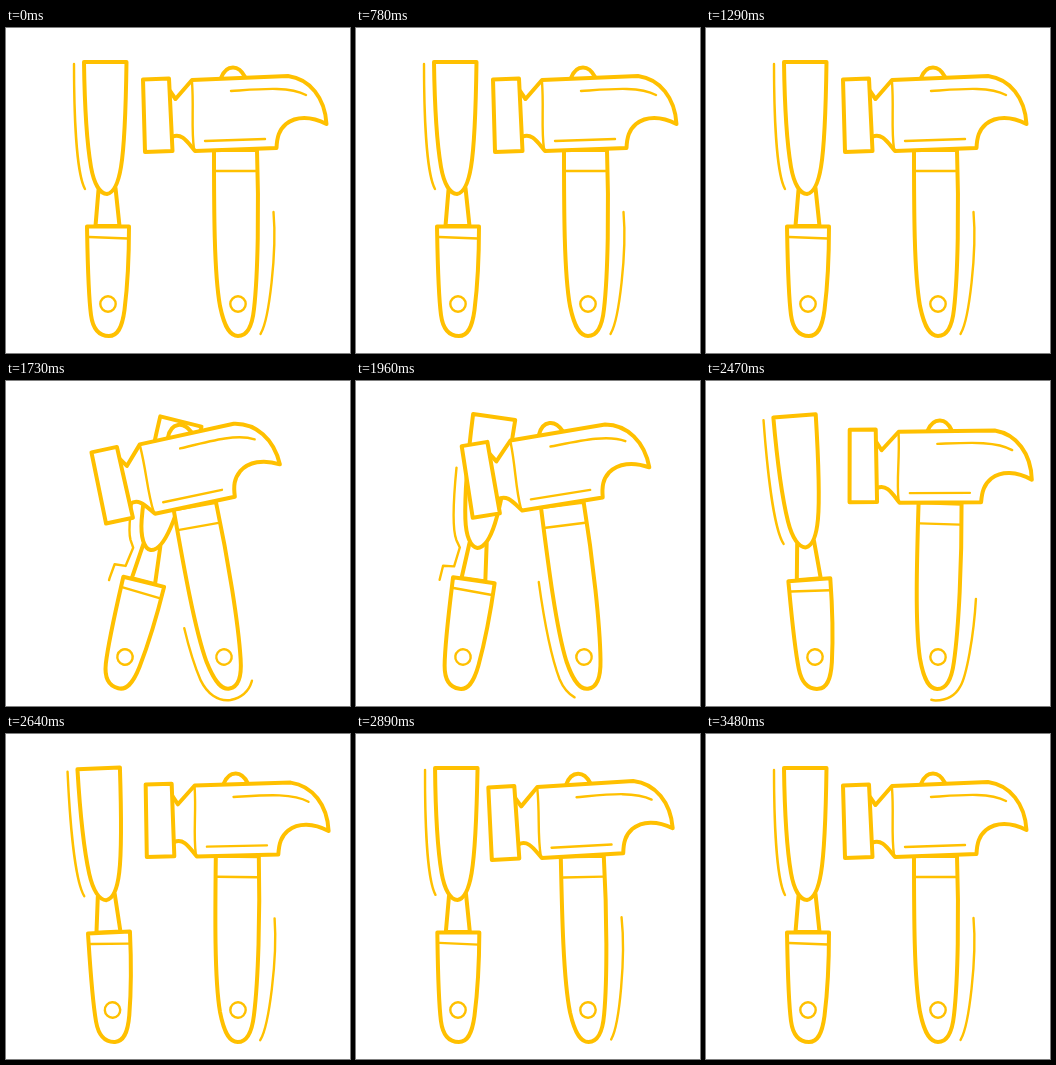
These frames come from a looping animation (344x325 px, 3560 ms). An HTML page:

```html
<!DOCTYPE html>
<html lang="en">
<head>
<meta charset="utf-8">
<title>Hammer and chisel</title>
<style>
html, body { margin: 0; width: 100%; height: 100%; overflow: hidden; background: #fff; }
svg { display: block; width: 344px; height: 325px; }
g { fill: #fff; stroke: #ffc000; stroke-width: 4; stroke-linejoin: round; stroke-linecap: round; }
.thin { fill: none; stroke-width: 2.4; }
.open { fill: none; }
</style>
</head>
<body>
<svg viewBox="0 0 344 325">
  <g id="chisel">
    <path d="M92.5 162L89.5 198H113.5L109.5 160"/>
    <path d="M78 34H120.5C120 70 119 115 115 139C112 157 107 165 101 166C94 166 88 156 85 139C80 110 78.5 70 78 34Z"/>
    <path d="M81 198.500H123C123 225 121 262 118.500 282C116 301 111 308 103 308C94 308 87 302 85 287C82 264 81.500 225 81 198.500Z"/>
    <path class="thin" d="M83 209L122 210.500"/>
    <circle class="thin" cx="102" cy="276" r="7.700"/>
    <path class="thin" id="chiselLine" d="M68 36C68 80 70 145 79 161L83.500 168L80.500 187.500L69.500 188.500L68 203L67 230"/>
  </g>
  <g id="hammer">
    <path class="thin" id="hammerLine" pathLength="291" d="M196.500 196C197 240 199 270 205 295C209 309 218 319 231 319.500C243 319 251 313 255 305C263 291 271 225 267.500 184"/>
    <path d="M208 122C208 180 208 245 214 278C219 302 225 308 232 308C240 308 246 300 248 281C252 246 253 180 251 122Z"/>
    <path class="thin" d="M210 143H250"/>
    <circle class="thin" cx="232" cy="276" r="7.700"/>
    <path d="M215 50C218 42 222 39.500 227 39.500C233 39.500 236 43 239 49"/>
    <path d="M164 63L169.500 71L186 52L282 48C304 51 319 70 320.500 96C305 88 290 88 280 96C273 102 271 109 270.500 120L189 123C182 115 176 104 166 109"/>
    <path d="M137 51.500L163 50.500L166.500 123L139 124Z"/>
    <path class="thin" d="M186 54C188 80 185 100 188 121M225 63C255 61 283 58 300 67M199 113L259 111"/>
  </g>
</svg>
<script>
const LOOP = 3560, STEPS = 42;
const el = id => document.getElementById(id);

// Tracks are [step, value] pairs, eased between neighbours.
const tools = [
  {
    name: "chisel", pivot: 102, dash: 126,
    x: [[18.3, 0], [20, 17], [21, 20], [25, -10], [26, -10], [29, 7], [34, 0]],
    turn: [[18.3, 0], [20, 14], [21, 16.5], [26, -7.5], [29, -4.2], [34, .25], [37, 0]],
    slide: [[18.3, 0], [20, 56], [21, 70], [25, 37], [29, 0]]
  },
  {
    name: "hammer", pivot: 232, dash: 124,
    x: [[18.3, 0], [20, -14], [21, -16], [25, 8], [26, 7.5], [29, 0]],
    turn: [[18.3, 0], [20, -10], [21, -12], [26, 1.7], [29, 1.7], [34, -1.2], [37, 0]],
    slide: [[18.3, 167], [20, 45], [22, 0], [25, 0], [29, 134], [31, 167]]
  }
];

function at(track, k) {
  const i = track.findIndex(p => p[0] > k);
  if (i === 0) return track[0][1];
  if (i < 0) return track[track.length - 1][1];
  const [a, from] = track[i - 1], [b, to] = track[i];
  const u = (k - a) / (b - a);
  return from + (to - from) * u * u * (3 - 2 * u);
}

function draw(now) {
  // The motion advances in about twelve poses a second.
  const k = Math.floor((now % LOOP - 5) * STEPS / LOOP);
  for (const t of tools) {
    el(t.name).setAttribute("transform",
      `translate(${at(t.x, k)} 0) rotate(${at(t.turn, k)} ${t.pivot} 276)`);
    const line = el(t.name + "Line");
    line.style.strokeDasharray = `${t.dash} 999`;
    line.style.strokeDashoffset = -at(t.slide, k);
  }
}

const start = performance.now();
function tick() {
  draw(performance.now() - start);
  requestAnimationFrame(tick);
}
tick();
</script>
</body>
</html>
```
